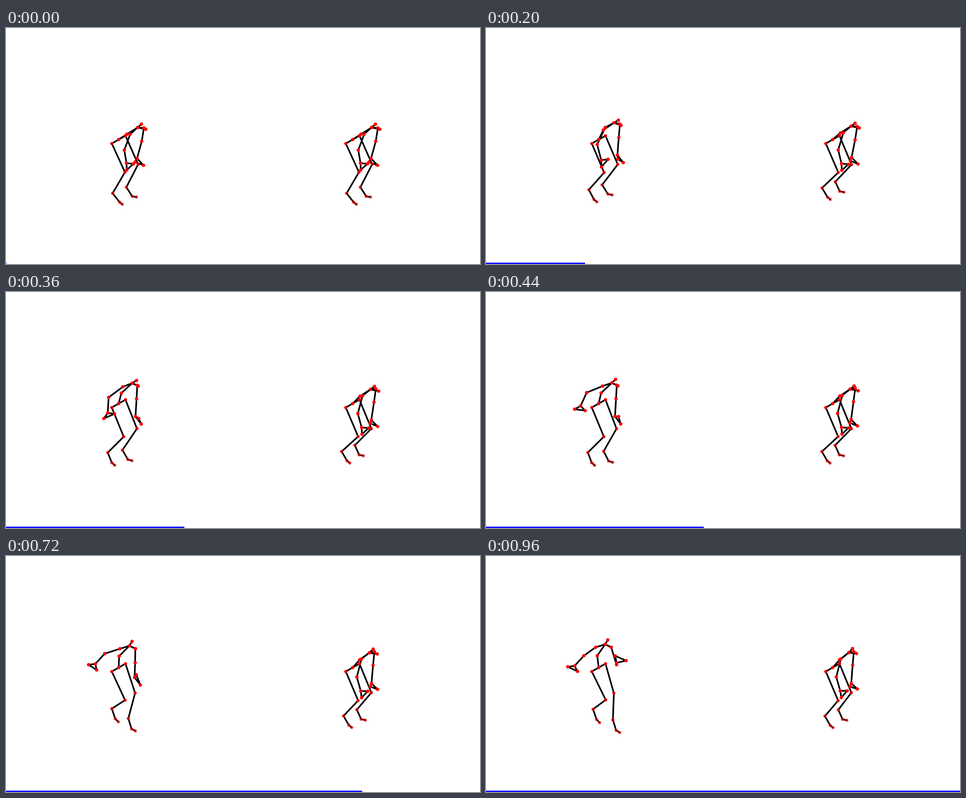
Recreate the animation shown at these times as a matplotlib script. Size 1058 by 529 pixels, loop 1 s.

```python
import numpy as np
import matplotlib.pyplot as plt
from matplotlib.animation import FuncAnimation
from matplotlib.collections import LineCollection
from matplotlib.patches import Rectangle

W, H, FRAMES, STEP = 1058, 529, 25, 40
TIME = np.arange(FRAMES)
HANDS = [("tip_l", "thumb_l"), ("tip_r", "thumb_r")]

# joint: (parent, step from the parent in the crouched starting pose)
BONES = dict(
    hip_a=("root", -15.3 + 9j), knee_a=("hip_a", 29.3 + 64.2j),
    ankle_a=("knee_a", -27.5 + 47.3j), foot_a=("ankle_a", 15.4 + 19.7j),
    toe_a=("foot_a", 6.2 + 5j),
    hip_b=("root", 15.2 - 8.5j), knee_b=("hip_b", 28.3 + 64j),
    ankle_b=("knee_b", -26.3 + 51.3j), foot_b=("ankle_b", 13 + 20.6j),
    toe_b=("foot_b", 9.5 + 1.5j),
    spine=("root", 18.5 - 12j), neck=("spine", 23.6 - 15j),
    nose=("neck", 8.6 - 7.5j), head=("neck", 18.5 + 4j),
    shoulder_l=("neck", -16.4 + 15j), elbow_l=("shoulder_l", -13.2 + 35.8j),
    wrist_l=("elbow_l", 5 + 29j), tip_l=("wrist_l", .6 + 15.2j),
    thumb_l=("wrist_l", 15.4 + 1.8j),
    shoulder_r=("neck", 14.2 + 1j), elbow_r=("shoulder_r", -4.8 + 30j),
    wrist_r=("elbow_r", -10.5 + 38.3j), tip_r=("wrist_r", 14.5 + 15.5j),
    thumb_r=("wrist_r", -4.3 + 8j),
)


def linear(u):
    return u


def ease_in(u):
    return u * u


def ease_out(u):
    return 1 - (1 - u) ** 2


def smooth(u):
    return u * u * (3 - 2 * u)


def fade(name):
    """Legs recede from the viewer, so lower joints are fainter."""
    leg = ["hip", "knee", "ankle", "foot", "toe"]
    part = name.split("_")[0]
    if part in leg:
        return .8 * .88 ** leg.index(part)
    return .88 if name == "elbow_r" else 1


class Puppet:
    """Stick figure whose bones turn (degrees) and foreshorten over time."""

    def __init__(self, root):
        self.root = root
        self.change = {name: np.ones(FRAMES, complex) for name in BONES}

    def turn(self, names, angle, begin, end, ease=smooth, scale=1):
        e = ease(np.clip((TIME - begin) / (end - begin), 0, 1))
        for name in names.split():
            self.change[name] *= (1 + (scale - 1) * e) * np.exp(1j * np.radians(angle) * e)

    def build(self, ax):
        self.at = {"root": np.full(FRAMES, self.root)}
        for name, (parent, step) in BONES.items():
            self.at[name] = self.at[parent] + step * self.change[name]
        self.links = [(parent, name) for name, (parent, _) in BONES.items()] + HANDS
        self.lines = LineCollection([], colors="black", linewidths=2.6,
                                    capstyle="round", zorder=1)
        ax.add_collection(self.lines)
        colors = [(1, 0, 0, fade(name)) for name in self.at]
        self.dots = ax.scatter(*self.points(0).T, s=20, c=colors, zorder=2)
        return self

    def points(self, n):
        return np.array([(p[n].real, p[n].imag) for p in self.at.values()])

    def draw(self, n):
        spot = dict(zip(self.at, self.points(n)))
        self.lines.set_segments([(spot[a], spot[b]) for a, b in self.links])
        self.dots.set_offsets(list(spot.values()))
        return [self.lines, self.dots]


def swinger():
    p = Puppet(251.5 + 250j)
    # the back straightens
    p.turn("spine", -44, 0, 11, ease_out, 1.1)
    p.turn("spine", -20, 11, 24, linear, 1.1)
    p.turn("neck", -11, 3, 10, scale=1.18)
    p.turn("neck", -12, 16, 24, scale=.94)
    p.turn("nose", 14, 0, 7)
    p.turn("nose", -32, 7, 15)
    p.turn("head", 14, 0, 9, scale=.8)
    # left arm swings out behind
    p.turn("shoulder_l", 25, 0, 15, ease_out)
    p.turn("elbow_l", 0, 0, 6, scale=1.13)
    p.turn("elbow_l", 58, 3, 14, scale=.86)
    p.turn("elbow_l", -24, 15, 24, scale=.87)
    p.turn("wrist_l", -5, 0, 6, scale=1.25)
    p.turn("wrist_l", 57, 6, 14, scale=.84)
    p.turn("tip_l", 85, 7, 15, ease_out)
    p.turn("thumb_l", -18, 0, 7)
    p.turn("thumb_l", 95, 7, 14, scale=.9)
    p.turn("thumb_l", -22, 15, 24)
    # right arm lifts towards the viewer: a negative scale folds it over
    p.turn("shoulder_r", 22, 0, 12, scale=.85)
    p.turn("shoulder_r", 0, 12, 20, scale=1.25)
    p.turn("elbow_r", -6, 0, 7, linear)
    p.turn("elbow_r", -20, 15, 24, ease_in, 1.35)
    p.turn("wrist_r", -12, 0, 7, ease_out)
    p.turn("wrist_r", -12, 15, 24, ease_in, -.51)
    p.turn("tip_r", 6, 0, 7)
    p.turn("tip_r", -29, 18, 24, scale=1.25)
    p.turn("thumb_r", -175, 0, 18, scale=.8)
    p.turn("thumb_r", -45, 18, 24, scale=-2.2)
    # one leg lifts while the other reaches down
    p.turn("knee_a", 2.5, 2, 7)
    p.turn("knee_a", -4, 8, 24)
    p.turn("ankle_a", 15, 0, 10, ease_out, .92)
    p.turn("ankle_a", 12, 11, 18, scale=.7)
    p.turn("ankle_a", -4, 18, 24)
    p.turn("foot_a", 19, 0, 15, ease_out, .97)
    p.turn("toe_a", 8, 0, 24, linear, 1.25)
    p.turn("knee_b", 8, 3, 24, linear, .98)
    p.turn("ankle_b", 11, 0, 7, ease_out)
    p.turn("ankle_b", -36, 7, 24, linear, 1.04)
    p.turn("foot_b", 15, 7, 18, linear)
    p.turn("toe_b", 23, 0, 24)
    return p


def croucher():
    p = Puppet(773.8 + 250j)
    p.turn("spine", -15, 0, 16, ease_out, 1.06)
    p.turn("neck head", -6, 7, 24, linear, .92)
    p.turn("nose", 5, 0, 5)
    p.turn("nose", -11, 8, 24, linear, 1.1)
    p.turn("shoulder_l", 4, 0, 10)
    p.turn("elbow_l wrist_l", -6, 0, 13, ease_out, 1.1)
    p.turn("tip_l thumb_l", -7, 6, 24, linear)
    p.turn("shoulder_r", -15, 3, 12, scale=.82)
    p.turn("elbow_r", -4, 4, 20, linear)
    p.turn("wrist_r", -11, 0, 24, ease_out, 1.03)
    p.turn("tip_r", -4, 0, 24, linear, .87)
    p.turn("thumb_r", -10, 0, 7, scale=.85)
    p.turn("knee_a knee_b", 1.6, 0, 7)
    p.turn("ankle_a ankle_b", 17.5, 0, 7, ease_out, .91)
    p.turn("ankle_a ankle_b", -7.5, 10, 24, linear, .92)
    p.turn("foot_a foot_b", 8, 0, 7, ease_out, .96)
    p.turn("toe_b", 4, 0, 5)
    return p


fig = plt.figure(figsize=(W / 100, H / 100), dpi=100, facecolor="white")
ax = fig.add_axes([0, 0, 1, 1])
ax.set(xlim=(0, W), ylim=(H, 0))
ax.axis("off")

puppets = [swinger().build(ax), croucher().build(ax)]
bar = ax.add_patch(Rectangle((0, H - 3), 0, 3, fc="blue", lw=0))


def update(n):
    bar.set_width(W * n / (FRAMES - 1) + 1)
    return [bar] + [artist for p in puppets for artist in p.draw(n)]


anim = FuncAnimation(fig, update, frames=FRAMES, interval=STEP,
                     init_func=lambda: update(0), repeat=True, repeat_delay=0)
plt.show()
```
